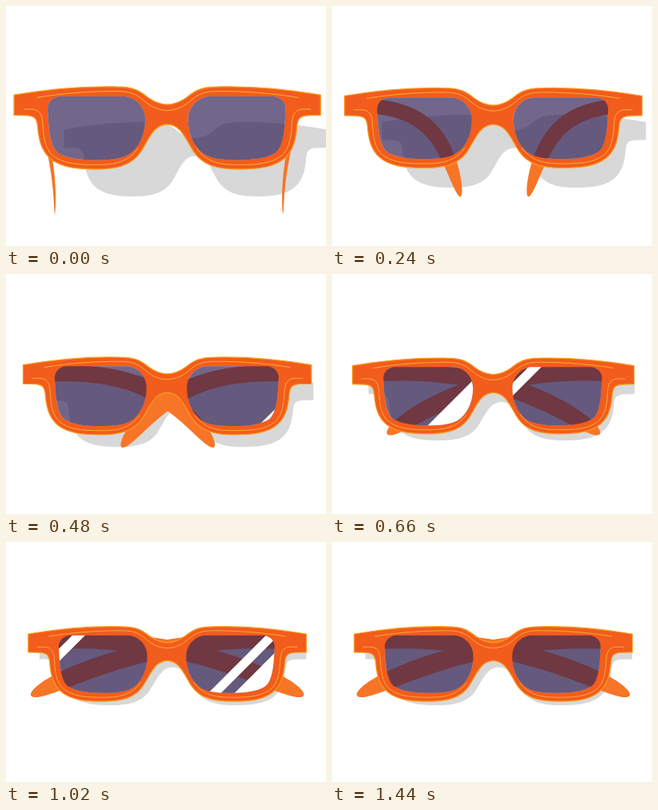
Recreate the animation shown at these times as an HTML page with a canvas. Size 400 px wide and 300 px high, loop 1470 ms.

```html
<!DOCTYPE html>
<html lang="en">
<head>
<meta charset="utf-8">
<title>Sunglasses</title>
<style>
  html, body { margin: 0; width: 100%; height: 100%; overflow: hidden; background: #fff; }
  canvas { display: block; width: 400px; height: 300px; }
</style>
</head>
<body>
<canvas id="stage" width="400" height="300"></canvas>
<script>
const ctx = document.getElementById('stage').getContext('2d');
const LOOP = 1470, STEP = 30, FOLD = 750;
const CX = 201.6, CY = 152.5, LENS_AXIS = CX - 0.8;

// Left halves only; the right side is mirrored.
const rim = new Path2D(`M202 123.2 C193 123.2 185 119.8 177 114 C166 105 158 101 138 101
  C97 100 52 104 10 111.2 L10 136.3 L26 136.8 C36 137.5 38.5 141 39.5 150
  C41 171 46 185 60 194 C74 202.5 91 204 113 204 C139 204 157 199 168 183
  C178 168 184 148 202 148`);
const lens = new Path2D(`M66 113 L148 113 C162 114 174 126 174 142
  C174 158 168 174 157 183 C147 191 132 192.5 112 192.5 C92 192.5 75 190 65 183.5
  C55 176 53 155 52 127 C53 119 58 115 66 113 Z`);
const lines = new Path2D(`M38 114.5 C70 109 105 106.5 138 106.5 C155 106.5 163 110 172 118
  C181 126 191 130.5 202 130.5 M22 129 L33 129 C43 130 45.5 137 46 148
  C47 170 51 183 63 190 C76 197.5 92 198.5 113 198.5 C139 198.5 153 194 165 178`);

const mix = (a, b, k) => a + (b - a) * k;
const easeOut = (p, n) => 1 - (1 - p) ** n;

function both(draw, axis = CX) {
  draw();
  ctx.save();
  ctx.translate(2 * axis, 0);
  ctx.scale(-1, 1);
  draw();
  ctx.restore();
}

function placed(x, y, sx, sy, draw) {
  ctx.save();
  ctx.translate(x, y);
  ctx.scale(sx, sy);
  ctx.translate(-CX, -CY);
  draw();
  ctx.restore();
}

// A temple folds inwards: its centre line swings while the foreshortened width grows.
function armPath(p) {
  const fast = easeOut(p, 3), mid = easeOut(p, 2), soft = p * (1.35 - 0.35 * p);
  const xs = [mix(45, 50, fast), mix(45, 150, fast), mix(62, 262, soft), mix(61, 372, p)];
  const ys = [125, mix(160, 118, fast), mix(190, 134, mid), mix(260, 192, p)];
  const bez = ([a, b, c, d], u, v) => v*v*v*a + 3*v*v*u*b + 3*v*u*u*c + u*u*u*d;
  const slope = ([a, b, c, d], u, v) => v*v*(b - a) + 2*v*u*(c - b) + u*u*(d - c);
  const base = 6 + 16 * Math.sqrt(fast), blunt = 2 + 10 * p;
  const upper = [], lower = [];
  for (let i = 0; i <= 60; i++) {
    const u = easeOut(i / 60, 2), v = 1 - u;
    const x = bez(xs, u, v), y = bez(ys, u, v);
    const angle = Math.atan2(slope(ys, u, v), slope(xs, u, v));
    const r = base / 2 * (1 + 0.3 * p * (u - 0.5)) * Math.sqrt(1 - u ** blunt);
    const nx = Math.sin(angle) * r, ny = -Math.cos(angle) * r;
    upper.push([x + nx, y + ny]);
    lower.unshift([x - nx, y - ny]);
  }
  const path = new Path2D();
  for (const q of [...upper, ...lower]) path.lineTo(...q);
  path.closePath();
  return path;
}

// Diagonal stripes sweep to the upper left, clipped to the lenses.
function drawGlare(t, scale) {
  const lead = 309 - (t - 660) * 1.09;
  const stripe = (from, width) => {
    const a = lead + from, b = a + width;
    ctx.beginPath();
    ctx.moveTo(a - 100, 100);
    ctx.lineTo(b - 100, 100);
    ctx.lineTo(b - 210, 210);
    ctx.lineTo(a - 210, 210);
    ctx.fill();
  };
  const clip = new Path2D();
  const shape = new Path2D(lens);
  shape.addPath(lens, new DOMMatrix([-1, 0, 0, 1, 2 * LENS_AXIS, 0]));
  clip.addPath(shape, new DOMMatrix().translate(CX, CY).scale(scale).translate(-CX, -CY));
  ctx.save();
  ctx.clip(clip);
  ctx.fillStyle = '#fff';
  for (const wide of [0, 558]) stripe(wide, 44);
  for (const thin of [53, 283, 525]) stripe(thin, 16);
  ctx.restore();
}

function render(t) {
  const p = Math.min(t / FOLD, 1);
  const scale = mix(1, 0.907, p);
  ctx.fillStyle = '#fff';
  ctx.fillRect(0, 0, 400, 300);

  ctx.fillStyle = '#d8d8d8';
  placed(mix(236.5, 208.5, p), mix(191.6, 160.2, p), mix(0.856, 0.87, p), mix(0.9, 0.85, p),
    () => both(() => ctx.fill(rim)));

  ctx.fillStyle = '#f77526';
  const arm = armPath(p);
  both(() => ctx.fill(arm), CX + mix(2, 0, p));

  placed(CX, CY, scale, scale, () => {
    // rim with the lens openings cut out, so the tint shows what lies behind
    const cut = new Path2D();
    cut.rect(0, 0, 400, 300);
    cut.addPath(lens);
    cut.addPath(lens, new DOMMatrix([-1, 0, 0, 1, 2 * LENS_AXIS, 0]));
    ctx.save();
    ctx.clip(cut, 'evenodd');
    ctx.fillStyle = '#f25c1c';
    both(() => ctx.fill(rim));
    ctx.restore();
    ctx.fillStyle = 'rgba(46,28,81,0.67)';
    both(() => ctx.fill(lens), LENS_AXIS);
  });
  drawGlare(t, scale);

  placed(CX, CY, scale, scale, () => both(() => {
    ctx.lineWidth = 1.3;
    ctx.strokeStyle = '#f99d1f';
    ctx.stroke(rim);
    ctx.lineWidth = 1;
    ctx.strokeStyle = '#fbb03b';
    ctx.stroke(lines);
  }));
}

const start = performance.now();
function tick() {
  const t = (performance.now() - start) % LOOP;
  render(Math.floor(t / STEP) * STEP);
  requestAnimationFrame(tick);
}
tick();
</script>
</body>
</html>
```
